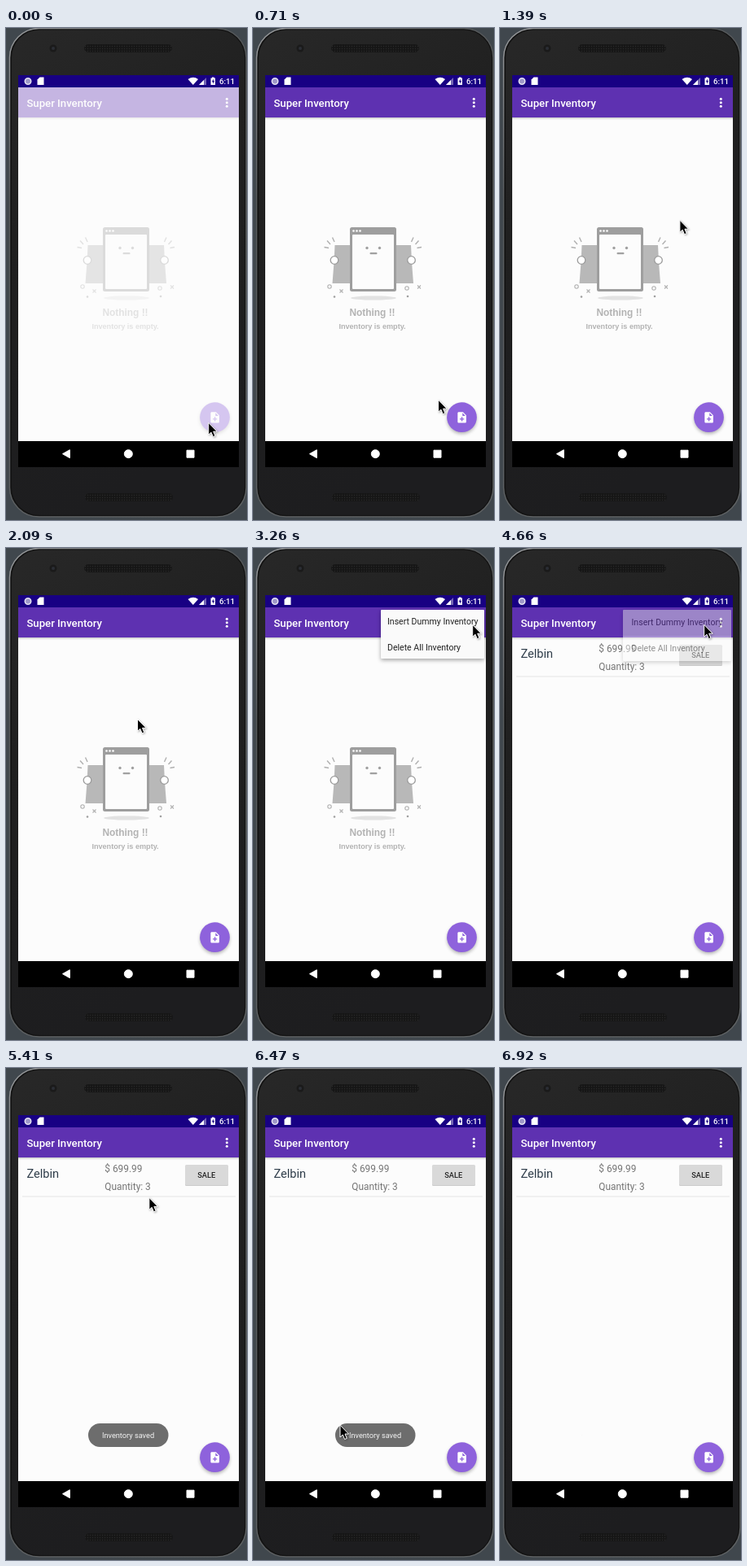
Animation of 296x605 px, one loop 7.19 s. Source, as an HTML page:

```html
<!DOCTYPE html>
<html lang="en">
<head>
<meta charset="utf-8">
<title>Super Inventory</title>
<style>
  html, body { margin: 0; width: 100%; height: 100%; overflow: hidden; background: #40474d; }
  svg { position: absolute; left: 0; top: 0; display: block; }
  text, #menu { font-family: Roboto, sans-serif; }
  #empty text { font: bold 11.9px "Liberation Sans", Arial, sans-serif; fill: #b3b3b3; text-anchor: middle; }
  #menu {
    position: absolute; top: 76px; overflow: hidden; background: #fafafa; border-radius: 1px;
    box-shadow: 0 2px 5px rgba(0,0,0,.35); font-size: 10.55px; line-height: 32px; color: #212121;
  }
  #menu div { position: absolute; left: 0; white-space: nowrap; }
  #ripple { width: 100%; height: 32px; background: #000; }
  #cursor { filter: drop-shadow(1px 1.5px 1px rgba(0,0,0,.3)); }
</style>
</head>
<body>
<svg width="296" height="605" viewBox="0 0 296 605">
  <defs>
    <linearGradient id="body" x2=".3" y2="1">
      <stop offset="0" stop-color="#282828"/><stop offset=".4" stop-color="#202020"/><stop offset="1" stop-color="#1d1d1f"/>
    </linearGradient>
    <linearGradient id="rim" x2=".4" y2="1">
      <stop offset="0" stop-color="#9a9c9e"/><stop offset=".3" stop-color="#55585a"/><stop offset="1" stop-color="#5e6163"/>
    </linearGradient>
    <linearGradient id="shade" x2="0" y2="1">
      <stop offset="0" stop-opacity=".2"/><stop offset="1" stop-opacity="0"/>
    </linearGradient>
    <pattern id="mesh" width="3" height="3" patternUnits="userSpaceOnUse">
      <rect width="3" height="3" fill="#161616"/><circle cx="1.5" cy="1.5" r=".7" fill="#292929"/>
    </pattern>
    <filter id="soft" x="-30%" y="-30%" width="160%" height="160%"><feGaussianBlur stdDeviation="2"/></filter>
  </defs>

  <!-- phone -->
  <rect x="4.500" y=".5" width="290.500" height="600.500" rx="36" fill="#121212" stroke="url(#rim)" stroke-width="1.500"/>
  <rect x="7" y="2.500" width="286" height="596.500" rx="34" fill="url(#body)"/>
  <circle cx="58" cy="25" r="4.500" fill="#1a1a1a"/><circle cx="58" cy="25" r="2" fill="#2b2e35"/>
  <rect x="96" y="20" width="108" height="10" rx="5" fill="url(#mesh)"/>
  <rect x="97" y="572" width="108" height="10" rx="5" fill="url(#mesh)"/>
  <rect x="15" y="58" width="271" height="482" fill="#fcfcfc"/>

  <g id="empty">
    <ellipse cx="148" cy="332" rx="28" ry="2.6" fill="#e2e2e2"/>
    <g id="side">
      <path d="M100.500 267H120V314H97.500L99.500 288Z" fill="#b8b8b8"/>
      <circle cx="100" cy="285.500" r="4.800" fill="#fff" stroke="#9b9b9b" stroke-width="1.300"/>
      <path d="M97.500 257.500L100 263M91 261.500L95 266M87.500 269.500L93 270.500" stroke="#b0b0b0" stroke-width="1.400"/>
    </g>
    <use href="#side" transform="matrix(-1 0 0 1 294.500 0)"/>
    <rect x="119" y="245" width="57" height="79" rx="2.500" fill="#9e9e9e"/>
    <rect x="122" y="254" width="51" height="67" rx="1" fill="#fcfcfc"/>
    <g fill="#fff"><circle cx="123.500" cy="249.500" r="1.300"/><circle cx="127.500" cy="249.500" r="1.300"/><circle cx="131.500" cy="249.500" r="1.300"/></g>
    <g fill="#a0a0a0">
      <circle cx="140" cy="270.500" r="1.700"/><circle cx="155.500" cy="270.500" r="1.700"/><rect x="143.500" y="276" width="9" height="2.300" rx="1"/>
      <circle cx="100" cy="330.500" r="1.300"/><circle cx="190" cy="330" r="1.300"/>
    </g>
    <g fill="none" stroke="#b0b0b0" stroke-width="1.100">
      <circle cx="94" cy="318" r="2.200"/><circle cx="189" cy="320" r="2.200"/>
      <path d="M106.500 321.500l4 4m0-4l-4 4M202 316.500l4 4m0-4l-4 4"/>
    </g>
    <text x="146.500" y="353.500">Nothing !!</text>
    <text x="146.500" y="369.500" style="font-size:9.1px">Inventory is empty.</text>
  </g>

  <g id="list" fill="#757575" font-size="11.86">
    <text x="25.400" y="135" font-size="14.6" fill="#2f3d4a">Zelbin</text>
    <text x="121.300" y="128">$ 699.99</text>
    <text x="121.300" y="149.500">Quantity: 3</text>
    <rect x="220" y="120" width="53" height="25" rx="1.500" fill="#cbcbcb"/>
    <rect x="220" y="119" width="53" height="25" rx="1.500" fill="#d9d9d9"/>
    <text x="246.200" y="135" font-size="9.23" font-weight="500" text-anchor="middle" fill="#222">SALE</text>
    <rect x="20" y="157.500" width="262" height="1" fill="#e6e6e6"/>
  </g>

  <!-- app bar -->
  <rect x="15" y="110" width="271" height="3" fill="url(#shade)"/>
  <rect x="15" y="73" width="271" height="37" fill="#5e31b1"/>
  <text x="25.400" y="97" font-size="13.2" font-weight="500" fill="#fff">Super Inventory</text>
  <g fill="#fff"><circle cx="271.300" cy="87.300" r="1.500"/><circle cx="271.300" cy="91.800" r="1.500"/><circle cx="271.300" cy="96.300" r="1.500"/></g>

  <!-- add button -->
  <circle cx="256.500" cy="481" r="18" opacity=".3" filter="url(#soft)"/>
  <circle cx="256.500" cy="478.700" r="18.400" fill="#8e62dc"/>
  <path transform="translate(248.700 471) scale(.66)" fill="#fff" d="M14 2H6c-1.100 0-2 .9-2 2V20c0 1.100.9 2 2 2H18c1.100 0 2-.9 2-2V8zm2 14h-3v3h-2v-3H8v-2h3v-3h2v3h3zm-3-7V3.500L18.500 9z"/>

  <g id="toast">
    <rect x="101" y="437" width="98.500" height="29" rx="14.500" fill="#6d6d6d"/>
    <text x="150" y="455" font-size="9.23" text-anchor="middle" fill="#f4f4f4">Inventory saved</text>
  </g>
  <rect id="veil" x="15" y="73" width="271" height="435" fill="#fcfcfc"/>

  <!-- system bars -->
  <rect x="15" y="58" width="271" height="15" fill="#180083"/>
  <g fill="#fff">
    <circle cx="27" cy="65.500" r="3.700" fill="#9d97c8" stroke="#e4e2f2" stroke-width="1.600"/>
    <path d="M41.500 60.500H46.500V70H38.500V63.500Z"/>
    <path d="M223.500 63Q230 58.500 236 63L229.800 70Z"/>
    <path d="M246 61V70H237Z" opacity=".4"/><path d="M243 64V70H237Z"/>
    <path d="M253 60.500h2.500v1h1.500V70h-5.500V61.500h1.500z"/>
    <path d="M254.800 62.500l-2 3.800h1.300v2.500l2-3.800h-1.300z" fill="#180083"/>
    <text x="262" y="69" font-size="9.700" font-weight="500">6:11</text>
  </g>
  <rect x="15" y="508" width="271" height="32"/>
  <g fill="#fff" stroke="#fff" stroke-linejoin="round">
    <path d="M69.500 523.700L78.300 518.700V528.700Z"/><circle cx="150.300" cy="523.700" r="5"/><rect x="222" y="519.200" width="9" height="9"/>
  </g>
</svg>

<div id="menu">
  <div id="ripple"></div>
  <div id="items">Insert Dummy Inventory<br>Delete All Inventory</div>
</div>

<svg width="296" height="605" viewBox="0 0 296 605">
  <path id="cursor" d="M.7-.7V14.200L4 11.200L6.300 16.700L9 15.600L6.700 10.200H11.300Z" stroke="#fff" stroke-width="1"/>
</svg>

<script>
const LOOP = 7190, STEP = 56;
const $ = id => document.getElementById(id);
const clamp = v => Math.max(0, Math.min(1, v));
const ramp = (t, from, to) => clamp((t - from) / (to - from));

// Moments at which a burst of screen updates begins.
const bursts = [0, 530, 1280, 2030, 2790, 3140, 3540, 4490, 5130, 5880, 6470];

// Pointer strokes: start, end, then points evenly spaced in time.
const strokes = [
  [474, 1220, [248,486], [240,472], [206,434], [135,340], [112,262], [160,231]],
  [1224, 1970, [160,231], [225,240], [242,300], [205,368], [145,374], [123,310], [131,262]],
  [1974, 2730, [131,262], [165,205], [205,160], [250,115], [280,90], [279,83], [275,87]],
  [2734, 2840, [275,87], [269,95]],
  [3484, 3700, [269,95], [250,95]],
  [5074, 5800, [250,95], [193,137], [151,199], [119,250]],
  [5824, 6100, [119,250], [112,340], [101,427]],
  [6414, 6915, [101,427], [125,480], [175,560], [202,608]],
];

// Catmull-Rom through the points, u counted in intervals.
function spline(points, u) {
  const last = points.length - 1;
  const i = Math.min(Math.floor(u), last - 1), f = u - i;
  const at = k => points[Math.max(0, Math.min(last, k))];
  return [0, 1].map(c => {
    const [a, b, d, e] = [-1, 0, 1, 2].map(k => at(i + k)[c]);
    return b + f / 2 * (d - a + f * (2*a - 5*b + 4*d - e + f * (3*(b - d) + e - a)));
  });
}

function pointer(t) {
  const [from, to, ...points] = strokes.findLast(s => s[0] <= t) || strokes[0];
  return spline(points, ramp(t, from, to) * (points.length - 1));
}

function draw(now) {
  const time = now % LOOP;
  const burst = bursts.findLast(b => b <= time);
  const t = burst + Math.floor((time - burst) / STEP) * STEP;

  $('veil').style.opacity = .65 * (1 - ramp(t, 0, 112));
  const saved = t >= 4650;
  $('empty').style.display = saved ? 'none' : '';
  $('list').style.display = saved ? '' : 'none';
  $('toast').style.opacity = ramp(t, 4660, 4880) * (1 - ramp(t, 6560, 6800));

  const menu = $('menu').style;
  const left = (1 - ramp(t, 3080, 3364)) ** 3;
  const width = 133 * (1 - .75 * left);
  menu.display = t >= 3140 && t < 4720 ? '' : 'none';
  menu.left = 284 - width + 'px';
  menu.width = width + 'px';
  menu.height = 63 * (1 - .7 * left) + 'px';
  menu.opacity = ramp(t, 3080, 3250) * (1 - ramp(t, 4590, 4720));
  $('items').style.transform = `translate(${10.5 - 43 * left}px, ${-20 * left}px)`;
  $('ripple').style.opacity = t < 4490 ? 0 : .04 + .06 * ramp(t, 4490, 4600);

  $('cursor').setAttribute('transform', `translate(${pointer(t)})`);
  requestAnimationFrame(() => draw(performance.now() - start));
}

const start = performance.now();
draw(0);
</script>
</body>
</html>
```
